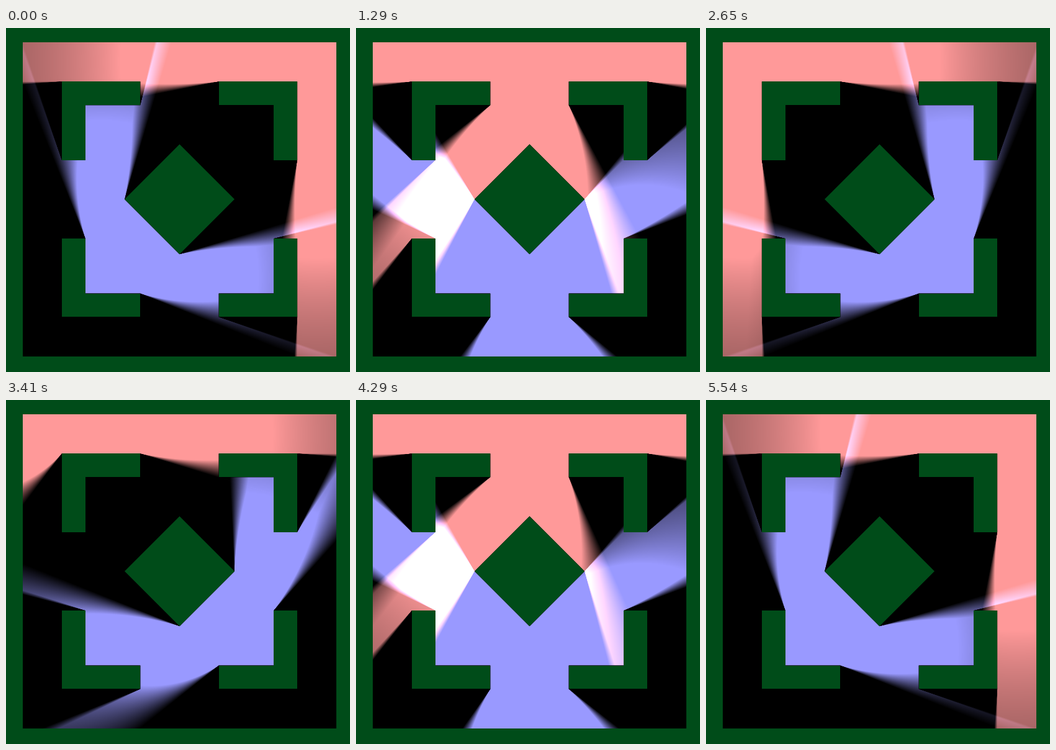
Write an HTML page with a canvas that moves like this. It is 554 by 554 pixels and loops after 5580 ms.

```html
<!DOCTYPE html>
<html lang="en">
<head>
<meta charset="utf-8">
<title>Two soft lights</title>
<style>
  html, body { margin: 0; width: 100%; height: 100%; overflow: hidden; background: #004c19; }
  canvas { display: block; width: 100vw; height: 100vh; }
</style>
</head>
<body>
<canvas id="stage" width="554" height="554"></canvas>
<script>
const SIZE = 554, LOOP = 5580, STEPS = 133;
const UNIT = 12.64, CX = 279.5, CY = 275.85;
const SHARP = 10; // higher means harder shadow edges
const WALL = '#004c19';

const px = u => CX + u * UNIT;
const py = v => CY + v * UNIT;
const toPixels = pts => pts.map(([u, v]) => [px(u), py(v)]);

// Room spans -20..20 units, with four corner brackets around a diamond.
const bracket = [[5, 12], [5, 15], [15, 15], [15, 5], [12, 5], [12, 12]];
const shapes = [[-1, -1], [1, -1], [1, 1], [-1, 1]]
  .map(([sx, sy]) => toPixels(bracket.map(([u, v]) => [u * sx, v * sy])));
shapes.push(toPixels([[0, -7], [7, 0], [0, 7], [-7, 0]]));
const corners = shapes.flat();
const qx = Float64Array.from(corners, c => c[0]);
const qy = Float64Array.from(corners, c => c[1]);

const left = Math.round(px(-20)), right = Math.round(px(20));
const top_ = Math.round(py(-20)), bottom = Math.round(py(20));
const roomW = right - left, roomH = bottom - top_;

const ctx = document.getElementById('stage').getContext('2d');
const maskCanvas = document.createElement('canvas');
maskCanvas.width = maskCanvas.height = SIZE;
const mask = maskCanvas.getContext('2d', { willReadFrequently: true });
const image = ctx.createImageData(roomW, roomH);
const pinkLevel = new Float32Array(roomW * roomH);
const blueLevel = new Float32Array(roomW * roomH);

function fillPoly(c, pts) {
  c.beginPath();
  pts.forEach(([x, y]) => c.lineTo(x, y));
  c.fill();
}

function eachEdge(fn) {
  for (const s of shapes) s.forEach((a, i) => fn(a, s[(i + 1) % s.length]));
}

function edgeDistance(x, y, a, b) {
  const ex = b[0] - a[0], ey = b[1] - a[1];
  const k = ((x - a[0]) * ex + (y - a[1]) * ey) / (ex * ex + ey * ey);
  const t = Math.max(0, Math.min(1, k));
  return Math.hypot(x - a[0] - ex * t, y - a[1] - ey * t);
}

// Free space around a light
function clearance(x, y) {
  let d = Math.min(x - px(-20), px(20) - x, y - py(-20), py(20) - y);
  eachEdge((a, b) => { d = Math.min(d, edgeDistance(x, y, a, b)); });
  return d;
}

// Hard shadows: every edge is stretched away from the light
function castShadows(lx, ly) {
  const far = ([x, y]) => [x + (x - lx) * 50, y + (y - ly) * 50];
  mask.fillStyle = '#fff';
  mask.fillRect(0, 0, SIZE, SIZE);
  mask.fillStyle = '#000';
  eachEdge((a, b) => fillPoly(mask, [a, b, far(b), far(a)]));
  for (const s of shapes) fillPoly(mask, s);
  return mask.getImageData(left, top_, roomW, roomH).data;
}

// Brightness falls with the angle between the light and the nearest corner
function shine(level, lx, ly) {
  const open = castShadows(lx, ly);
  const reach = SHARP * clearance(lx, ly);
  const n = qx.length, limit = 1 / (SHARP * SHARP);
  let i = 0;
  for (let y = 0; y < roomH; y++) {
    const yy = y + top_ + 0.5, dy = ly - yy;
    for (let x = 0; x < roomW; x++, i++) {
      const m = open[i * 4];
      if (!m) { level[i] = 0; continue; }
      const xx = x + left + 0.5, dx = lx - xx;
      const dd = dx * dx + dy * dy;
      let best = limit;
      for (let k = 0; k < n; k++) {
        const ax = qx[k] - xx, ay = qy[k] - yy;
        const aa = ax * ax + ay * ay;
        if (aa > ax * dx + ay * dy) continue;
        const cross = ax * dy - ay * dx;
        const s = cross * cross / (aa * dd);
        if (s < best) best = s;
      }
      const soft = Math.min(1, SHARP * Math.sqrt(best), reach / Math.sqrt(dd));
      level[i] = soft * m / 255;
    }
  }
}

function drawWalls() {
  ctx.fillStyle = WALL;
  ctx.fillRect(0, 0, SIZE, top_);
  ctx.fillRect(0, bottom, SIZE, SIZE - bottom);
  ctx.fillRect(0, 0, left, SIZE);
  ctx.fillRect(right, 0, SIZE - right, SIZE);
  shapes.forEach((s, i) => {
    fillPoly(ctx, i < 4 ? s.map(p => p.map(Math.round)) : s);
  });
}

function draw(time) {
  const swing = Math.cos(2 * Math.PI * (time + 33) / LOOP);
  shine(pinkLevel, px(17.5 * swing), py(-17.5));
  shine(blueLevel, px(-10 * swing), py(10));
  const out = image.data;
  for (let i = 0, o = 0; i < pinkLevel.length; i++, o += 4) {
    const p = pinkLevel[i], b = blueLevel[i];
    out[o] = 255 * p + 153 * b;
    out[o + 1] = 153 * (p + b);
    out[o + 2] = 153 * p + 255 * b;
    out[o + 3] = 255;
  }
  ctx.putImageData(image, left, top_);
  drawWalls();
}

const start = performance.now();
let shown = -1;
function tick() {
  const t = (performance.now() - start) % LOOP;
  const step = Math.floor(t / LOOP * STEPS + 0.1) % STEPS;
  if (step !== shown) {
    shown = step;
    draw(step * LOOP / STEPS);
  }
  requestAnimationFrame(tick);
}
tick();
</script>
</body>
</html>
```
